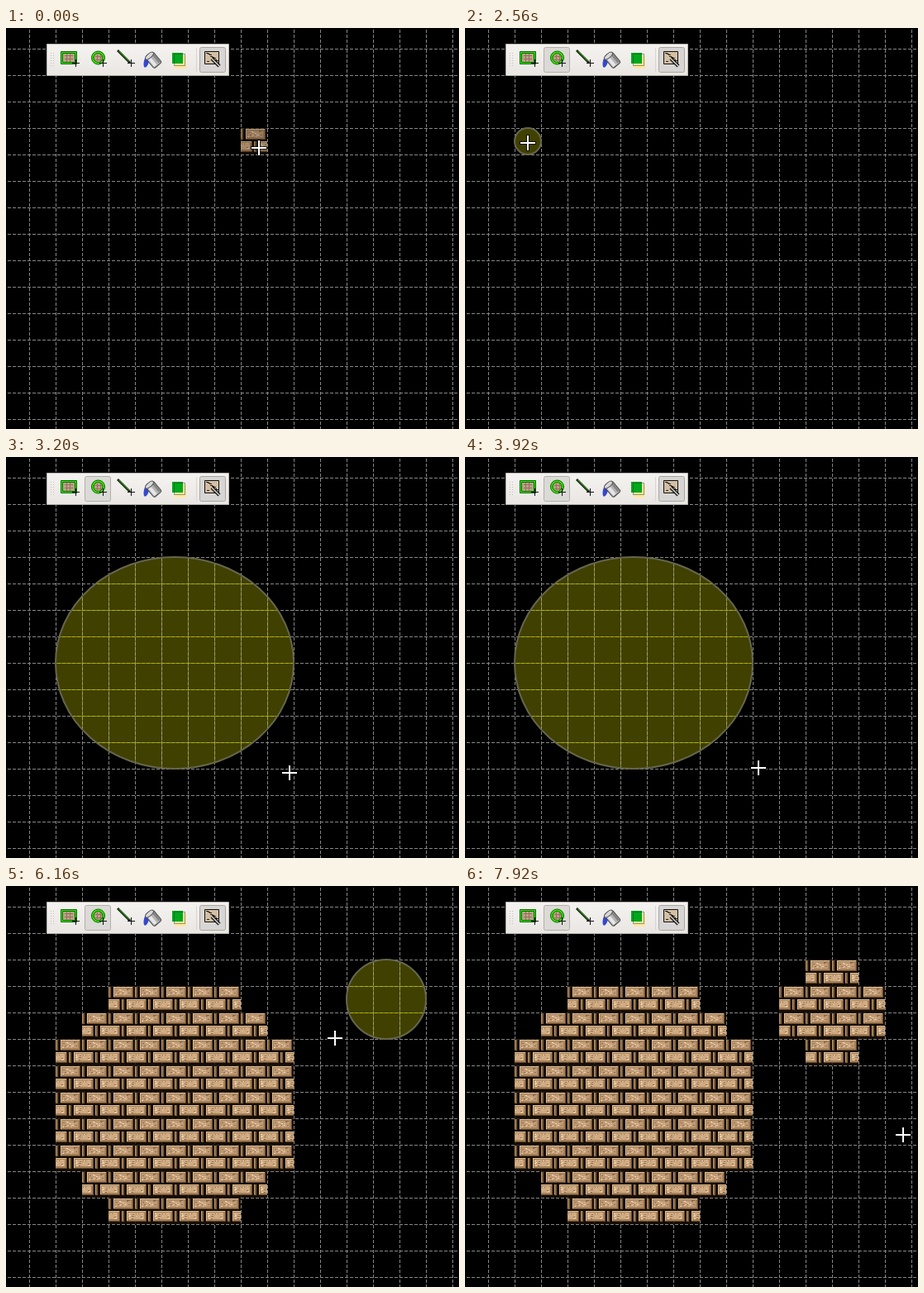
Recreate the animation shown at these times as an HTML page with a canvas. Size 548 by 485 pixels, loop 8 s.

```html
<!DOCTYPE html>
<html>
<head>
<meta charset="utf-8">
<style>
html, body { margin: 0; width: 548px; height: 485px; overflow: hidden; background: #000; }
canvas { display: block; }
</style>
</head>
<body>
<canvas id="stage" width="548" height="485"></canvas>
<script>
const W = 548, H = 485, LOOP = 8000, STEP = 80;
const CELL = 32, GX = 28, GY = 25;
const BAR = { x: 49, y: 19, w: 221, h: 39 };
const DASH = [4, 2], GREEN = '#35e800', DARK_GREEN = '#0b6a00', INK = '#111';
const ctx = document.getElementById('stage').getContext('2d');

// Pointer stops; bend is how far the middle of a move bows away from a straight line
const HOME = [306, 145], BUTTON = [117, 43], PICK = 1440;
const moves = [
  { from: 240, end: 960, to: BUTTON },
  { from: 1760, end: 2320, to: [66, 125] },
  { from: 2480, end: 3360, to: [356, 375], bend: [37, 89] },
  { from: 3840, end: 4320, to: [346, 394] },
  { from: 4800, end: 5680, to: [501, 83] },
  { from: 5840, end: 6480, to: [394, 205], bend: [-50, 40] },
  { from: 6560, end: 6800, to: [391, 219] },
  { from: 7040, end: 7920, to: [530, 301], bend: [0, 60] }
];
const drags = [
  { from: 2480, drop: 4720 },
  { from: 5840, drop: 7120 }
];

const ease = k => k * k * (3 - 2 * k);
const clamp01 = k => Math.min(1, Math.max(0, k));

function pointer(t) {
  let [x, y] = HOME;
  for (const { from, end, to, bend = [0, 0] } of moves) {
    const k = ease(clamp01((t - from) / (end - from)));
    const bow = 4 * k * (1 - k);
    x += (to[0] - x) * k + bend[0] * bow;
    y += (to[1] - y) * k + bend[1] * bow;
  }
  return { x: Math.round(x), y: Math.round(y) };
}

const snap = (v, origin, fn) => origin + CELL * fn((v - origin) / CELL);
const corner = p => ({ x: snap(p.x, GX, Math.round), y: snap(p.y, GY, Math.round) });

// Rectangle between the snapped press point and the snapped pointer
function dragBox(drag, t) {
  const a = corner(pointer(drag.from)), b = corner(pointer(t));
  return {
    x: Math.min(a.x, b.x), y: Math.min(a.y, b.y),
    w: Math.abs(a.x - b.x), h: Math.abs(a.y - b.y)
  };
}

function box(x, y, w, h, fill, c = ctx) {
  c.fillStyle = fill;
  c.fillRect(x, y, w, h);
}

function frame(x, y, w, h, fill, stroke, r = 0) {
  ctx.beginPath();
  ctx.roundRect(x + .5, y + .5, w - 1, h - 1, r);
  paint(fill, stroke);
}

function paint(fill, stroke, width = 1) {
  if (fill) { ctx.fillStyle = fill; ctx.fill(); }
  if (stroke) { ctx.strokeStyle = stroke; ctx.lineWidth = width; ctx.stroke(); }
}

function line(x0, y0, x1, y1, color, width = 1, dash = []) {
  ctx.setLineDash(dash);
  ctx.beginPath();
  ctx.moveTo(x0, y0);
  ctx.lineTo(x1, y1);
  paint(null, color, width);
  ctx.setLineDash([]);
}

function oval(x, y, rx, ry, fill, stroke, width, turn = 0) {
  ctx.beginPath();
  ctx.ellipse(x, y, rx, ry, turn, 0, Math.PI * 2);
  paint(fill, stroke, width);
}

function grid(rowColor, columnColor, dash) {
  for (let y = GY + .5; y < H; y += CELL) line(2, y, W - 2, y, rowColor, 1, dash);
  for (let x = GX + .5; x < W; x += CELL) line(x, 2, x, H, columnColor, 1, dash);
}

function makeTile() {
  const tile = document.createElement('canvas');
  tile.width = tile.height = CELL;
  const c = tile.getContext('2d');
  const specks = ['#efd8b8', '#8d6e50', '#dcbd98'];
  let seed = 7;
  const pick = n => Math.floor((seed = seed * 16807 % 2147483647) / 2147483647 * n);

  box(0, 0, CELL, CELL, '#150d06', c);
  for (let row = 0; row < 2; row++) {
    const left = row * 16, top = row ? 16 : 1, rowSeed = seed;
    for (const x of [left + 6, left + 6 - CELL]) {
      seed = rowSeed;
      box(x, top, 24, 13, '#5f4428', c);
      box(x, top, 23, 12, '#e2c39a', c);
      box(x + 1, top + 1, 22, 11, '#a68058', c);
      box(x + 2, top + 2, 19, 8, row ? '#cfa980' : '#c09a74', c);
      for (let i = 0; i < 18; i++) box(x + 2 + pick(18), top + 2 + pick(8), 2, 1, specks[pick(3)], c);
    }
    box(left, top, 3, 13, '#7d5b38', c);
    box(left, top, 1, 12, '#c3a074', c);
  }
  return tile;
}
const tile = makeTile();

// Fill every cell whose centre lies inside the ellipse
function fillTiles({ x, y, w, h }) {
  for (let cy = CELL / 2; cy < h; cy += CELL) {
    for (let cx = CELL / 2; cx < w; cx += CELL) {
      if ((2 * cx / w - 1) ** 2 + (2 * cy / h - 1) ** 2 <= 1) {
        ctx.drawImage(tile, x + cx - CELL / 2, y + cy - CELL / 2);
      }
    }
  }
}

function rubberBand({ x, y, w, h }) {
  if (!w || !h) return;
  const shape = [x + w / 2, y + h / 2, w / 2, h / 2];
  ctx.save();
  oval(...shape, '#404000');
  ctx.clip();
  grid('#8c8c00', '#77773a', []);
  grid('#b0b010', '#a0a060', DASH);
  ctx.restore();
  oval(...shape, null, '#66664f', 2);
}

function plus(x, y) {
  box(x - 4, y, 9, 1, INK);
  box(x, y - 4, 1, 9, INK);
}

function hatch(x, y, size, color) {
  for (let d = 2; d < size; d += 4) {
    box(x + d, y, 1, size, color);
    box(x, y + d, size, 1, color);
  }
}

function rectIcon() {
  frame(66, 28, 20, 16, GREEN, DARK_GREEN);
  frame(68, 30, 16, 12, '#b3a684', DARK_GREEN);
  hatch(71, 31, 10, '#a06a62');
  plus(84, 42);
}

function circleIcon() {
  oval(111.5, 36, 8, 8, GREEN, DARK_GREEN);
  oval(111.5, 36, 5.5, 5.5, '#b3a684', DARK_GREEN);
  hatch(108, 32, 8, '#a06a62');
  plus(117, 42);
}

function lineIcon() {
  line(135, 27, 150, 42, INK, 2.6);
  line(136, 27.5, 149, 40.5, GREEN, 1);
  plus(151, 42);
}

function bucketIcon() {
  oval(170, 40, 3, 8, '#3448d0', null, 1, .25);
  ctx.save();
  ctx.translate(178, 39);
  ctx.rotate(-.7);
  frame(-6, -8, 13, 17, '#b4b4b4', '#444', 2);
  box(-4, -6, 4, 13, '#e6e6e6');
  box(3, -6, 3, 13, '#858585');
  oval(0, -7, 6, 2.6, '#d8d8d8', '#555');
  ctx.restore();
}

function stampIcon() {
  box(204, 33, 14, 16, '#ffe7a2');
  box(201, 30, 13, 13, '#00a81c');
  ctx.setLineDash([1, 1]);
  frame(203, 31, 14, 15, null, '#33402a');
  ctx.setLineDash([]);
}

function wandIcon() {
  frame(240, 28, 18, 16, '#d2bfa4', INK);
  for (let i = 0; i < 9; i++) box(242 + i * 5 % 13, 30 + i * 4 % 11, 3, 1, '#2a2119');
  line(249, 37, 258, 46, INK, 4);
  line(249, 37, 258, 46, '#d2d2d2', 1.6);
}

function toolbar(picked) {
  const shade = ctx.createLinearGradient(0, BAR.y, 0, BAR.y + BAR.h);
  shade.addColorStop(0, '#f5f3f1');
  shade.addColorStop(1, '#e9e6e2');
  frame(BAR.x, BAR.y, BAR.w, BAR.h, shade, '#b5b1ab');
  for (let y = 30; y < 48; y += 3) {
    box(54, y, 1, 1, '#c4bfb9');
    box(57, y, 1, 1, '#c4bfb9');
  }
  if (picked) frame(95, 23, 32, 31, '#dcdad7', '#b3afab', 2);
  frame(234, 23, 32, 31, '#d8d6d4', '#a9a5a1', 2);
  box(230, 24, 1, 29, '#d8d4cf');
  [rectIcon, circleIcon, lineIcon, bucketIcon, stampIcon, wandIcon].forEach(icon => icon());
}

function cross({ x, y }) {
  for (const [pad, color] of [[1, 'rgba(0,0,0,.75)'], [0, '#fff']]) {
    box(x - 9 - pad, y - 1 - pad, 18 + 2 * pad, 2 + 2 * pad, color);
    box(x - 1 - pad, y - 9 - pad, 2 + 2 * pad, 18 + 2 * pad, color);
  }
}

function arrow({ x, y }) {
  ctx.save();
  ctx.translate(x + .5, y + .8);
  const shape = new Path2D('M0 0V15.5L3.4 12.4L6 18.5L8.8 17.3L6.2 11.3H10.8Z');
  ctx.fillStyle = '#fff';
  ctx.fill(shape);
  ctx.strokeStyle = '#2b2b2b';
  ctx.lineWidth = 1.1;
  ctx.stroke(shape);
  ctx.restore();
}

function draw(t) {
  const p = pointer(t);
  const onBar = p.x >= BAR.x && p.x < BAR.x + BAR.w && p.y >= BAR.y && p.y < BAR.y + BAR.h;
  const picked = t >= PICK;

  box(0, 0, W, H, '#000');
  grid('#858585', '#858585', DASH);
  for (const d of drags) if (t >= d.drop) fillTiles(dragBox(d, d.drop - STEP));
  if (!picked && !onBar) {
    ctx.globalAlpha = .8;
    ctx.drawImage(tile, snap(p.x, GX, Math.floor), snap(p.y, GY, Math.floor));
  }
  ctx.globalAlpha = .2;
  grid('#858585', '#858585', DASH);
  ctx.globalAlpha = 1;
  for (const d of drags) if (t >= d.from && t < d.drop) rubberBand(dragBox(d, t));
  toolbar(picked);
  (onBar ? arrow : cross)(p);
}

const start = performance.now();
function tick() {
  const t = (performance.now() - start) % LOOP;
  draw(Math.floor(t / STEP) * STEP);
  requestAnimationFrame(tick);
}
tick();
</script>
</body>
</html>
```
